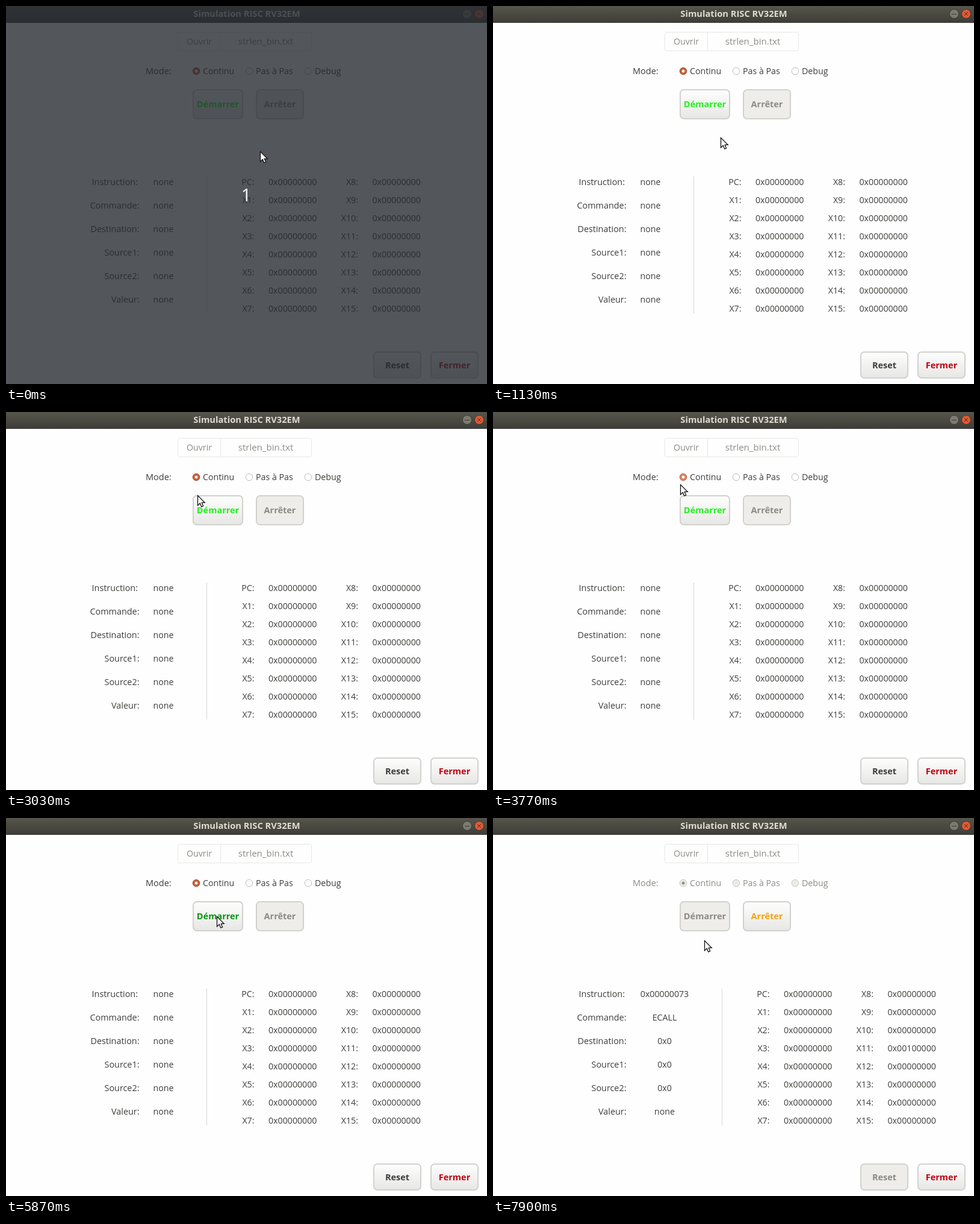
These frames come from a looping animation (799x627 px, 8 s). An HTML page with a canvas:

```html
<!DOCTYPE html>
<html lang="fr">
<head>
<meta charset="utf-8">
<title>Simulation RISC RV32EM</title>
<style>
  html, body { margin: 0; width: 100%; height: 100%; overflow: hidden; background: #fefefe; }
  canvas { display: block; }
</style>
</head>
<body>
<canvas id="stage" width="799" height="627"></canvas>
<script>
const ctx = document.getElementById('stage').getContext('2d');
const LOOP = 8000, PRESS = 6370, RUN = 6530;
const INK = '#3d3d3a', FADED = '#8b8b85', PAPER = '#fefefe';

// Turning points of the pointer; it eases from each to the next.
const turns = [
  { at: 600, x: 422, y: 241 },
  { at: 1430, x: 360, y: 208 },
  { at: 1930, x: 300, y: 180 },
  { at: 2330, x: 314, y: 112 },
  { at: 2730, x: 348, y: 181 },
  { at: 3030, x: 318, y: 138 },
  { at: 3230, x: 335, y: 108 },
  { at: 3730, x: 311, y: 120 },
  { at: 4030, x: 376, y: 122 },
  { at: 4530, x: 354, y: 120 },
  { at: 5030, x: 358, y: 174 },
  { at: 5330, x: 370, y: 146 },
  { at: 5830, x: 350, y: 163 },
  { at: 7530, x: 350, y: 163 },
  { at: 7830, x: 351, y: 203 }
];

function pointerAt(time) {
  const t = Math.floor((time - 30) / 100) * 100 + 30;   // moves ten times a second
  const next = turns.findIndex(turn => turn.at > t);
  const b = turns.at(next), a = turns[next - 1] ?? b;
  const k = a === b ? 0 : (t - a.at) / (b.at - a.at);
  const eased = k * k * (3 - 2 * k);
  return [Math.round(a.x + (b.x - a.x) * eased), Math.round(a.y + (b.y - a.y) * eased)];
}

function text(str, x, y, { color = INK, align = 'left', size = 14.2, bold = false } = {}) {
  ctx.font = `${bold ? 'bold ' : ''}${size}px "Open Sans", "Noto Sans", sans-serif`;
  ctx.textAlign = align;
  ctx.fillStyle = color;
  ctx.fillText(str, x, y);
}

function box(x, y, w, h, radius, fill, stroke, lineWidth) {
  ctx.beginPath();
  ctx.roundRect(x, y, w, h, radius);
  ctx.fillStyle = fill;
  ctx.fill();
  ctx.strokeStyle = stroke;
  ctx.lineWidth = lineWidth;
  ctx.stroke();
}

function line(x0, y0, x1, y1, color) {
  ctx.beginPath();
  ctx.moveTo(x0, y0);
  ctx.lineTo(x1, y1);
  ctx.strokeStyle = color;
  ctx.lineWidth = 1;
  ctx.stroke();
}

function circle(x, y, r, fill, stroke = fill) {
  ctx.beginPath();
  ctx.arc(x, y, r, 0, 2 * Math.PI);
  ctx.fillStyle = fill;
  ctx.fill();
  ctx.strokeStyle = stroke;
  ctx.lineWidth = 1;
  ctx.stroke();
}

function vertical(y0, y1, top, bottom) {
  const gradient = ctx.createLinearGradient(0, y0, 0, y1);
  gradient.addColorStop(0, top);
  gradient.addColorStop(1, bottom);
  return gradient;
}

function button(label, x, y, w, h, color, state) {
  const fill = { off: '#eeedea', pressed: '#e8e8e5', on: vertical(y, y + h, PAPER, '#e6e7e4') }[state];
  box(x + 1, y + 1, w - 2, h - 2, 6, fill, '#d1d2ce', 2);
  text(label, x + w / 2, y + h / 2 + 5,
    { color: state === 'off' ? FADED : color, align: 'center', size: 14.5, bold: true });
}

function titleBar() {
  ctx.fillStyle = vertical(0, 28, '#57564c', '#3d3c37');
  ctx.fillRect(0, 0, 799, 28);
  text('Simulation RISC RV32EM', 400, 18, { color: '#dfdbd2', align: 'center', size: 14.7, bold: true });
  circle(766, 13, 7.5, '#7d7b71', '#403f39');
  line(762, 13.5, 770, 13.5, '#3b3a35');
  circle(786, 13, 7.5, '#e05a35', '#4a3a32');
  line(783, 10, 789, 16, '#55291b');
  line(789, 10, 783, 16, '#55291b');
}

function fileChooser() {
  box(285.5, 43.5, 222, 31, 3, PAPER, '#e7e7e4', 1);
  line(356.5, 44, 356.5, 74, '#e7e7e4');
  text('Ouvrir', 321, 64, { color: FADED, align: 'center' });
  text('strlen_bin.txt', 431.5, 64, { color: FADED, align: 'center', size: 15 });
}

function radio(label, x, chosen, running, hover) {
  const [fill, ring] = running ? ['#ecebe8', '#c6c6c2']
    : !chosen ? [PAPER, '#bdbdb8']
    : hover ? ['#d98460', '#c0633e'] : ['#c9623c', '#a94a28'];
  circle(x, 108, 5.8, fill, ring);
  if (chosen) circle(x, 108, 2, running ? FADED : PAPER);
  text(label, x + 11, 113, { color: running ? FADED : INK });
}

function modes(running, hover) {
  text('Mode:', 232, 113, { color: running ? FADED : INK, size: 14.5 });
  radio('Continu', 316, true, running, hover);
  radio('Pas à Pas', 404, false, running);
  radio('Debug', 502, false, running);
}

function instruction(running) {
  const results = ['0x00000073', 'ECALL', '0x0', '0x0', '0x0', 'none'];
  ['Instruction:', 'Commande:', 'Destination:', 'Source1:', 'Source2:', 'Valeur:'].forEach((label, i) => {
    const y = 297 + 39 * i;
    text(label, i ? 221.5 : 219, y, { align: 'right', size: 14.4 });
    text(running ? results[i] : 'none', running ? 285 : 261.5, y, { align: 'center' });
  });
}

function registers(running) {
  const shift = running ? 47 : 0;
  line(333.5 + shift, 283, 333.5 + shift, 510, '#d9d9d6');
  for (let i = 0; i < 16; i++) {
    const x = shift + (i < 8 ? 412.5 : 585), y = 297 + 30 * (i % 8);
    text(i ? `X${i}:` : 'PC:', x, y, { align: 'right' });
    text(running && i === 11 ? '0x00100000' : '0x00000000', x + 23.5, y);
  }
}

const arrow = new Path2D('M.5 .5V17L4.3 13.4L6.8 19.2L9.6 18L7.2 12.4H12.2Z');

function pointer(x, y) {
  ctx.save();
  ctx.translate(x, y);
  ctx.fillStyle = '#fff';
  ctx.fill(arrow);
  ctx.strokeStyle = '#111';
  ctx.lineWidth = 1.3;
  ctx.stroke(arrow);
  ctx.restore();
}

function countdown() {
  ctx.fillStyle = 'rgba(38, 43, 49, .79)';
  ctx.fillRect(0, 0, 799, 627);
  text('1', 399, 324, { color: '#fff', align: 'center', size: 29 });
}

function draw(t) {
  const running = t >= RUN;
  const [x, y] = pointerAt(t);
  const overMode = x > 305 && x < 382 && y > 97 && y < 126;
  const overStart = x >= 312 && x < 392 && y >= 140 && y < 186;

  ctx.fillStyle = PAPER;
  ctx.fillRect(0, 0, 799, 627);
  titleBar();
  fileChooser();
  modes(running, overMode);
  button('Démarrer', 310, 138, 84, 50, overStart ? '#0b9412' : '#22f01e',
    running ? 'off' : t >= PRESS ? 'pressed' : 'on');
  button('Arrêter', 415, 138, 80, 50, '#f5a310', running ? 'on' : 'off');
  instruction(running);
  registers(running);
  button('Reset', 610, 573, 80, 45, INK, running ? 'off' : 'on');
  button('Fermer', 705, 573, 80, 45, '#c4000e', 'on');
  if (t < 30) countdown();
  pointer(x, y);
}

function frame() {
  draw(performance.now() % LOOP);
  requestAnimationFrame(frame);
}
frame();
</script>
</body>
</html>
```
